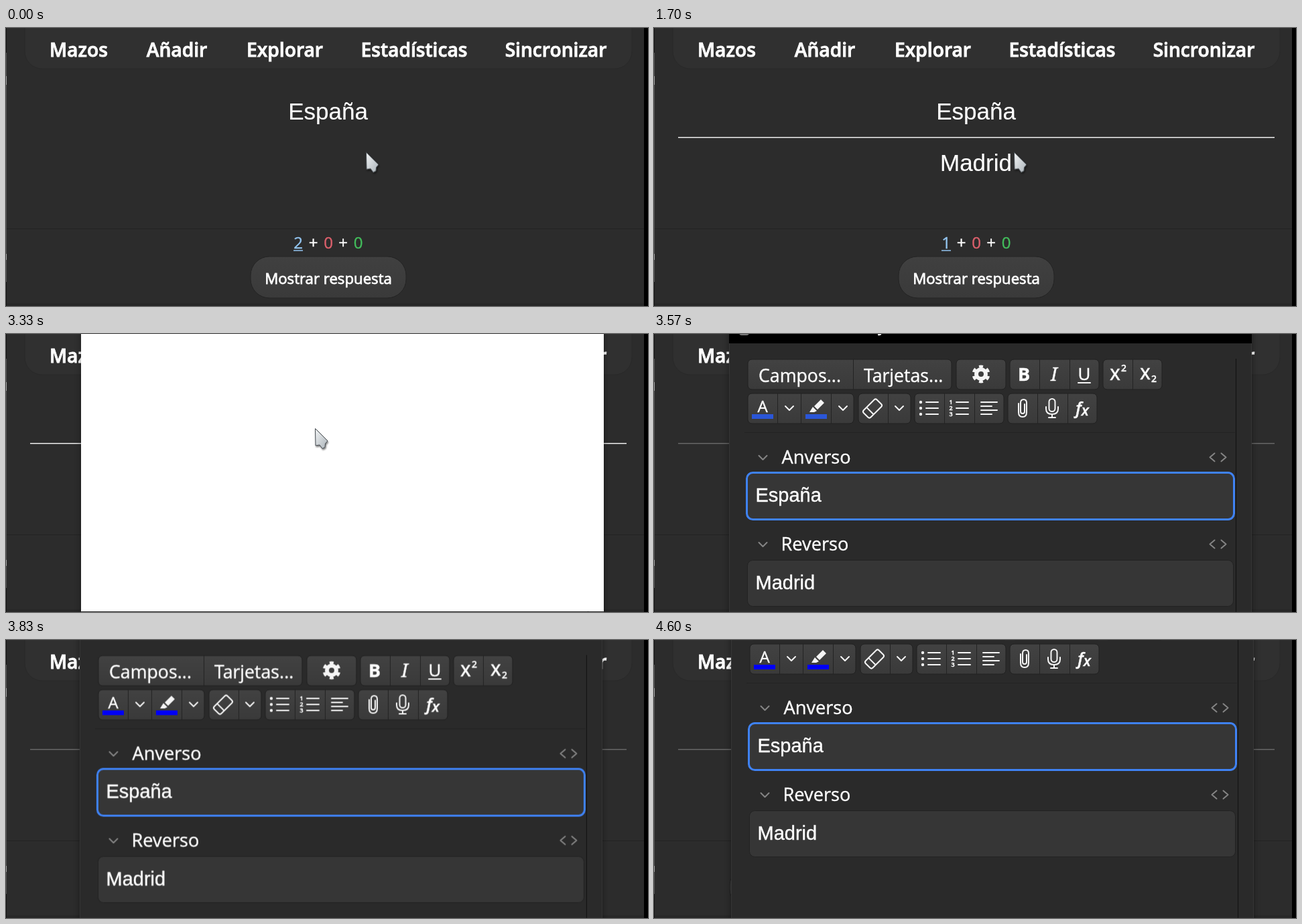
An HTML page that plays this animation: 958 by 416 pixels, repeating every 4.91 s.

```html
<!DOCTYPE html>
<html lang="es">
<head>
<meta charset="utf-8">
<title>Tarjetas</title>
<style>
  html, body { margin: 0; width: 100%; height: 100%; overflow: hidden; background: #2c2c2c; }
  svg { display: block; width: 100%; height: 100%; }
  text {
    color: #fff; fill: currentColor; stroke: currentColor; stroke-width: .4px;
    font-family: "Open Sans", "Noto Sans", sans-serif;
  }
  .mid text { text-anchor: middle; }
  .menu text { font-size: 28.2px; font-weight: 600; stroke-width: .9px; }
  .card text { font: 35px "Liberation Sans", Arial, sans-serif; stroke-width: .2px; }
  .field text { font: 29px "Liberation Sans", Arial, sans-serif; }
  .count text, .times text { font-size: 24px; }
  .count .new { color: #93c5f0; }
  .count .learn { color: #dc606c; }
  .count .due { color: #43bd5c; }
  .pill rect { fill: url(#pill); stroke: #242424; }
  .pill text { font-size: 22.2px; font-weight: 500; stroke-width: .8px; }
  .label text { font-size: 27.2px; }
  .big text { font-size: 26.7px; }
  .tools rect { fill: url(#tool); stroke: #202020; }
  .split { stroke: #232323; fill: none; }
  .icon { fill: none; stroke: #f5f5f5; stroke-width: 2; stroke-linecap: round; stroke-linejoin: round; }
  .dim { stroke: #858585; }
  .solid { fill: #f5f5f5; }

  /* One loop is 4910 ms; every track shares that clock. */
  .track { animation: 4.91s step-end infinite; }
  .ask { animation-name: ask; }
  .answer { animation-name: answer; }
  .first { animation-name: first; }
  .second { animation-name: second; }
  .count1 { animation-name: count1; }
  .count2 { animation-name: count2; }
  .back1 { animation-name: back1; }
  .back2 { animation-name: back2; }
  .rule { animation-name: rule; }
  .blank { animation-name: blank; }
  .ink { animation-name: ink; }
  .window { animation-name: window; transform-origin: 499px 208px; }
  .cursor { animation-name: cursor; }

  @keyframes ask {
    0%, 34.623% { opacity: 1; } 16.293%, 54.379%, 100% { opacity: 0; }
  }
  @keyframes answer {
    0%, 34.623% { opacity: 0; } 16.293%, 54.379%, 100% { opacity: 1; }
  }
  @keyframes first { 0% { opacity: 1; } 35.234%, 100% { opacity: 0; } }
  @keyframes second { 0% { opacity: 0; } 35.234%, 100% { opacity: 1; } }
  @keyframes count2 { 0% { opacity: 1; } 34.623%, 100% { opacity: 0; } }
  @keyframes count1 { 0% { opacity: 0; } 34.623%, 100% { opacity: 1; } }
  @keyframes back1 { 0%, 35.234%, 100% { opacity: 0; } 16.293% { opacity: 1; } }
  @keyframes back2 { 0% { opacity: 0; } 54.379%, 100% { opacity: 1; } }
  @keyframes rule {
    0%, 35.234% { opacity: 0; fill: #ededed; }
    16.293%, 54.379% { opacity: 1; fill: #ededed; }
    70.876%, 100% { opacity: 1; fill: #666; }
  }
  @keyframes blank { 0% { opacity: 1; } 70.876%, 100% { opacity: 0; } }
  @keyframes ink { 0% { fill: #2b56d8; } 76.782%, 100% { fill: #0000f5; } }
  @keyframes window {
    0% { opacity: 0; transform: translate(3px, 0) scale(.94); }
    66.2% { opacity: 0; transform: translate(3px, 0) scale(.94); animation-timing-function: steps(3); }
    67.821% { opacity: 1; transform: translate(3px, 0); }
    73.32% { opacity: 1; transform: translate(3px, 0); animation-timing-function: steps(4); }
    75.967% { opacity: 1; transform: none; }
    76.171% { opacity: 1; transform: none; animation-timing-function: steps(7); }
    80.855% { opacity: 1; transform: translate(3px, -51px); animation-timing-function: steps(4); }
    83.503%, 100% { opacity: 1; transform: translate(6px, -83px); }
  }
  @keyframes cursor {
    0% { transform: translate(537px, 185.5px); }
    65.17% { transform: translate(537px, 185.5px); animation-timing-function: steps(3); }
    67.821% { transform: translate(461px, 141px); animation-timing-function: steps(6); }
    71.894%, 100% { transform: translate(330px, -40px); }
  }
</style>
</head>
<body>
<svg viewBox="0 0 958 416" preserveAspectRatio="none">
  <defs>
    <linearGradient id="pill" x2="0" y2="1"><stop stop-color="#404040"/><stop offset="1" stop-color="#3a3a3a"/></linearGradient>
    <linearGradient id="tool" x2="0" y2="1"><stop stop-color="#424242"/><stop offset="1" stop-color="#3a3a3a"/></linearGradient>
    <linearGradient id="arrow" x2="1" y2="1"><stop stop-color="#f4f6f7"/><stop offset="1" stop-color="#aab2b8"/></linearGradient>
    <filter id="shade" x="-10%" y="-10%" width="120%" height="120%"><feDropShadow dx="0" dy="2" stdDeviation="5" flood-opacity=".4"/></filter>
    <filter id="soft" x="-50%" y="-50%" width="200%" height="200%"><feDropShadow dx="1" dy="2" stdDeviation="1" flood-opacity=".5"/></filter>
    <path id="down" d="M-6-3 0 3 6-3"/>
    <path id="code" d="M-5-6-12 0-5 6M5-6 12 0 5 6"/>
    <path id="rows" d="M0-9H18M0 0H18M0 9H18"/>
  </defs>

  <rect width="958" height="416" fill="#2c2c2c"/>
  <rect x="28" y="-30" width="906" height="91" rx="26" fill="#303030" stroke="#292929"/>
  <g class="menu mid">
    <text x="108.5" y="43">Mazos</text>
    <text x="255" y="43">Añadir</text>
    <text x="416" y="43">Explorar</text>
    <text x="609" y="43">Estadísticas</text>
    <text x="820.5" y="43">Sincronizar</text>
  </g>

  <g class="card mid">
    <text class="track first" x="480.5" y="137">España</text>
    <text class="track second" x="480.5" y="137">Madrid</text>
    <rect class="track rule" x="36" y="163" width="890" height="1.5"/>
    <text class="track back1" x="480.5" y="214">Madrid</text>
    <text class="track back2" x="480.5" y="214">España</text>
  </g>

  <path d="M0 300.5H952" stroke="#232323"/>
  <rect y="412" width="952" height="4" fill="#272727"/>

  <g class="track ask mid">
    <g class="count">
      <text class="track count2 new" x="436" y="330">2</text>
      <text class="track count1 new" x="436" y="330">1</text>
      <path d="M429 333H443" stroke="#93c5f0" stroke-width="1.5"/>
      <text x="458.5" y="330">+</text>
      <text class="learn" x="481" y="330">0</text>
      <text x="503" y="330">+</text>
      <text class="due" x="525.5" y="330">0</text>
    </g>
    <g class="pill">
      <rect x="365" y="342" width="232" height="62" rx="28"/>
      <text x="481" y="383">Mostrar respuesta</text>
    </g>
  </g>

  <g class="track answer mid">
    <g class="times">
      <text x="192" y="327">&lt;10 m</text>
      <text x="384.5" y="327">1,9 h</text>
      <text x="577.5" y="327">3,7 h</text>
      <text x="770" y="327">4 d</text>
    </g>
    <g class="pill">
      <rect x="113" y="339" width="156" height="62" rx="28"/><text x="191.5" y="380">Otra vez</text>
      <rect x="306" y="339" width="156" height="62" rx="28"/><text x="384" y="380">Difícil</text>
      <rect x="500" y="339" width="156" height="62" rx="28"/><text x="577.5" y="380">Bien</text>
      <rect x="693" y="339" width="156" height="62" rx="28"/><text x="770.5" y="380">Fácil</text>
    </g>
  </g>

  <path d="M.5 37V380" stroke="#505050"/>
  <path d="M.5 72V85M.5 338V347" stroke="#a5a5a5"/>
  <path d="M.5 0V37M.5 380V416" stroke="#111"/>
  <rect x="952" width="6" height="416" fill="#000"/>

  <g class="track window">
    <rect x="109" y="-19" width="780" height="620" fill="#2c2c2c" filter="url(#shade)"/>
    <path d="M109.5 14V600M888.5 14V600" stroke="#363636"/>
    <rect x="109" y="-19" width="780" height="33" fill="#000"/>
    <rect x="125" y="-12" width="13" height="13" rx="3" fill="none" stroke="#777" stroke-width="2"/>
    <text x="229" y="-4" font-size="24">Editar tarjeta</text>
    <path d="M132 147.5H864" class="split"/>
    <path d="M865.5 37V600" stroke="#111"/>

    <g class="tools">
      <rect x="137" y="38" width="304" height="45" rx="6"/>
      <rect x="448" y="38" width="74" height="45" rx="6"/>
      <rect x="528" y="38" width="133" height="45" rx="6"/>
      <rect x="667" y="38" width="88" height="45" rx="6"/>
      <rect x="137" y="89" width="158" height="45" rx="6"/>
      <rect x="302" y="89" width="78" height="45" rx="6"/>
      <rect x="386" y="89" width="133" height="45" rx="6"/>
      <rect x="525" y="89" width="133" height="45" rx="6"/>
    </g>
    <path class="split" d="M294.5 38v45M572.5 38v45M617.5 38v45M711.5 38v45M181.5 89v45M216.5 89v45M261.5 89v45M346.5 89v45M430.5 89v45M475.5 89v45M569.5 89v45M614.5 89v45"/>

    <g class="big">
      <text x="153" y="72">Campos...</text>
      <text x="310" y="72">Tarjetas...</text>
    </g>

    <!-- Text style tools -->
    <g class="icon">
      <circle cx="485" cy="60" r="7" stroke-width="6"/>
      <circle cx="485" cy="60" r="11" stroke-width="5" pathLength="12" stroke-dasharray="1 1" stroke-dashoffset="-.5" stroke-linecap="butt"/>
      <path d="M630 73H648"/>
    </g>
    <g class="mid" font-size="27">
      <text x="549" y="70" font-weight="700">B</text>
      <text x="594" y="70" style="font:italic 27px 'Noto Serif',serif">I</text>
      <text x="639" y="69" font-size="26">U</text>
      <g font-weight="600">
        <text x="685" y="69" font-size="24">X</text><text x="698" y="56" font-size="14">2</text>
        <text x="730" y="68" font-size="24">X</text><text x="743" y="72" font-size="14">2</text>
      </g>
      <text x="159" y="117" font-size="24">A</text>
      <text x="636" y="120" style="font:italic 600 25px 'Open Sans','Noto Sans',sans-serif">f<tspan font-size="22" dy="2">x</tspan></text>
    </g>
    <rect class="track ink" x="143" y="120" width="32" height="7"/>
    <rect class="track ink" x="223" y="120" width="32" height="7"/>
    <path class="solid" d="M246 98 251 103 241 113 236 108ZM234 109 240 115 236 117H229Z"/>

    <g class="icon">
      <use href="#down" x="199" y="111"/><use href="#down" x="279" y="111"/><use href="#down" x="363" y="111"/>
      <g transform="translate(323 111.500) rotate(-45)">
        <rect x="-14" y="-7.500" width="28" height="15" rx="3"/><path d="M-5-7V7"/>
      </g>
      <use href="#rows" x="403" y="111"/><use href="#rows" x="448" y="111"/>
      <path d="M485 102H509M485 108H501M485 114H509M485 120H501"/>
      <path d="M541 104V117Q541 124 547 124T553 117V103Q553 98 548.5 98T544 103V116Q544 119 547 119T550 116V105"/>
      <rect x="586.5" y="97" width="9" height="19" rx="4.5"/>
      <path d="M582 109V112Q582 120 591 120T600 112V109M591 120V125M586 125H596"/>
    </g>
    <g class="solid">
      <circle cx="395" cy="102" r="2.2"/><circle cx="395" cy="111" r="2.2"/><circle cx="395" cy="120" r="2.2"/>
    </g>
    <g class="mid" font-size="9" font-weight="600">
      <text x="440" y="105">1</text><text x="440" y="114">2</text><text x="440" y="123">3</text>
    </g>

    <g class="icon dim">
      <use href="#down" x="159.5" y="185"/><use href="#code" x="838.5" y="184.5"/>
      <use href="#down" x="159.5" y="315"/><use href="#code" x="838.5" y="314.5"/>
    </g>
    <g class="label">
      <text x="187.5" y="194">Anverso</text>
      <text x="186.5" y="324">Reverso</text>
    </g>
    <g class="field">
      <rect x="135.5" y="207.5" width="727" height="70" rx="9" fill="#363636" stroke="#3f82f4" stroke-width="3"/>
      <text x="148.5" y="251">España</text>
      <rect x="136.5" y="338.5" width="725" height="69" rx="8" fill="#363636" stroke="#222"/>
      <text x="148.5" y="382">Madrid</text>
    </g>
    <rect class="track blank" x="109" y="-19" width="780" height="434" fill="#fff"/>
  </g>

  <g class="track cursor">
    <path d="M.5.5 1 26 7 25 11 30.500 15 28.500 15.500 23 19 19Z" fill="url(#arrow)" stroke="#454b50" stroke-linejoin="round" filter="url(#soft)"/>
  </g>
</svg>
</body>
</html>
```
